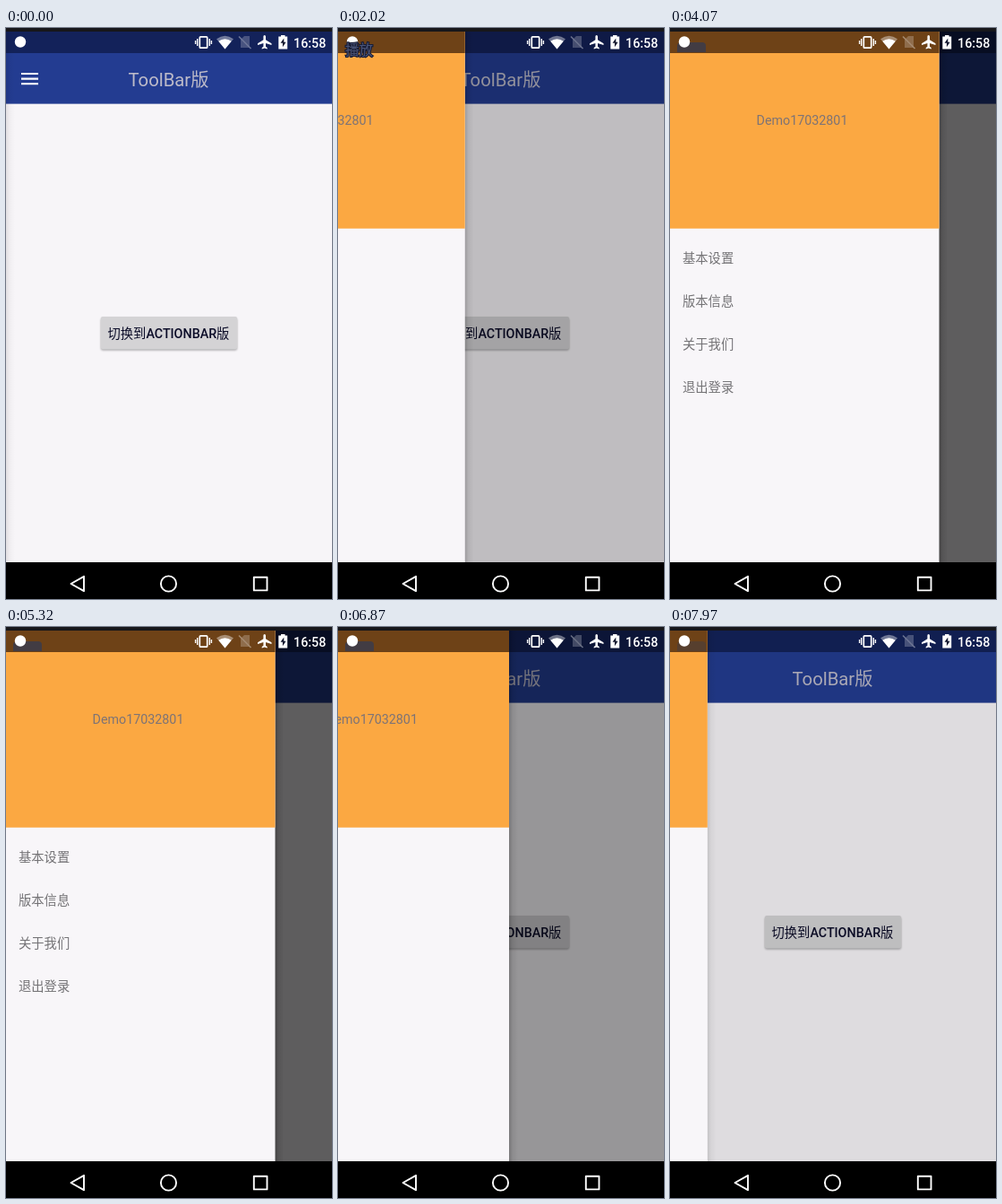
Write an HTML page that moves like this. It is 364 px wide and 637 px high and loops after 8000 ms.

```html
<!DOCTYPE html>
<html lang="zh">
<head>
<meta charset="utf-8">
<style>
html, body { margin: 0; height: 100%; overflow: hidden; background: #000; }
svg { display: block; width: 364px; height: 637px; }
text { font: 14.3px Roboto, "Noto Sans CJK SC", "Noto Sans CJK", sans-serif; }
.title { font-size: 20.3px; fill: #bdbbc9; }
.button { font-weight: 500; fill: #0b0c28; }
.button .cjk { font-weight: 400; }
.clock { font-weight: 500; fill: #fff; }
.menu { fill: #747376; }
.hint { font-size: 15.5px; fill: #4a5477; stroke: #171c35; stroke-width: 2.2px; paint-order: stroke; }
</style>
</head>
<body>
<svg viewBox="0 0 364 637">
  <defs>
    <linearGradient id="shade">
      <stop offset="0" stop-color="#000" stop-opacity=".3"/>
      <stop offset=".4" stop-color="#000" stop-opacity=".1"/>
      <stop offset="1" stop-color="#000" stop-opacity="0"/>
    </linearGradient>
    <filter id="soft" x="-10%" y="-20%" width="120%" height="150%"><feGaussianBlur stdDeviation="1.1"/></filter>
  </defs>

  <!-- page -->
  <rect width="364" height="596" fill="#f7f5f8"/>
  <rect width="364" height="84.6" fill="#233c91"/>
  <rect width="364" height="28" fill="#13225a"/>
  <path d="M17 51h19M17 56.6h19M17 62.2h19" stroke="#fff" stroke-width="2.1"/>
  <text class="title" x="136.5" y="64.6">ToolBar版</text>
  <rect x="106" y="323.5" width="152" height="36" rx="2" fill="#000" opacity=".35" filter="url(#soft)"/>
  <rect x="106" y="322" width="152" height="36.5" rx="2" fill="#d4d3d5"/>
  <text class="button" x="113.5" y="345.7"><tspan class="cjk">切换到</tspan>ACTIONBAR<tspan class="cjk">版</tspan></text>
  <rect id="scrim" width="364" height="596"/>

  <!-- drawer, origin at its right edge -->
  <g id="drawer">
    <rect id="shadow" y="4" width="10" height="592" fill="url(#shade)"/>
    <rect x="-301" width="301" height="596" fill="#f8f6f9"/>
    <rect x="-301" width="301" height="223.7" fill="#fba842"/>
    <rect x="-301" width="301" height="28" fill="#6e4217"/>
    <text x="-204" y="107.5" fill="#7d7376">Demo17032801</text>
    <g id="menu"></g>
  </g>

  <!-- system bars -->
  <rect width="364" height="4" fill="#17171b"/>
  <path id="stain" d="M8 27V20q0-4 5-4h23q4 0 4 4v7z" fill="#3b3b4b"/>
  <circle cx="16" cy="15.5" r="6.2" fill="#fff"/>
  <text id="hint" class="hint" x="8" y="29.5">播放</text>
  <g fill="none" stroke="#fff" stroke-width="1.7">
    <rect x="216.3" y="9.8" width="8.4" height="12.4" rx="1"/>
    <path d="M213.7 12v8M227.3 12v8M211.6 14v4M229.4 14v4" stroke-width="1.4"/>
  </g>
  <path d="M235 12.2q9.5-7 19 0L244.5 23.5z" fill="#fff" opacity=".4"/>
  <path d="M237.3 14.8q7.2-5 14.4 0L244.5 23.5z" fill="#fff"/>
  <g opacity=".38">
    <path d="M262 13l4-4h6v13h-10z" fill="#fff" opacity=".6"/>
    <path d="M260 9.5l13.5 13.5" stroke="#fff" stroke-width="1.6"/>
  </g>
  <path d="M296.5 19v-1.8l-6.500-4v-3.7q0-1.5-1.3-1.5t-1.3 1.5v3.7l-6.4 4V19l6.4-2v3.8l-1.7 1.3v1.3l3-.8 3 .8v-1.3l-1.700-1.300V17z" fill="#fff"/>
  <path d="M307 9.500V8h4.500v1.500h2.700V23.500h-9.900V9.500z" fill="#fff"/>
  <path d="M310.300 11.500l-3.800 5.300h2.400v4.400l3.700-5.500h-2.300z" fill="#13182f"/>
  <text class="clock" x="321" y="21.500">16:58</text>
  <rect y="596" width="364" height="41"/>
  <g fill="none" stroke="#fff" stroke-width="1.9" stroke-linejoin="round">
    <path d="M87 611.800v16.400L72.500 620z"/>
    <circle cx="181.500" cy="620" r="8.600"/>
    <rect x="276.800" y="612.700" width="14.700" height="14.700"/>
  </g>
</svg>
<script>
const LOOP = 8000;
const FULL = 300.5;
// time, drawer width, scrim opacity
const keys = [
  [0, 0, 0], [1250, 0, 0], [1790, 88.4, .1], [2565, 268, .535], [2960, FULL, .62],
  [5782, FULL, .62], [6000, 296, .61], [6250, 274, .565], [6885, 191, .39], [7970, 41.8, .1]
];
// start, end and number of redraws while the drawer is dragged
const drags = [
  [1330, 2020, 10], [2170, 2960, 11], [5860, 6640, 11], [6730, 7040, 5], [7190, 7970, 11]
];
const $ = id => document.getElementById(id);

['基本设置', '版本信息', '关于我们', '退出登录'].forEach((label, i) => {
  $('menu').insertAdjacentHTML('beforeend',
    `<text class="menu" x="-286.5" y="${261.5 + 48 * i}">${label}</text>`);
});

// Time of the latest redraw at time t
function snap(t) {
  let last = 0;
  for (const [start, end, count] of drags) {
    if (t < start) break;
    const step = (end - start) / (count - 1);
    last = Math.min(end, start + Math.floor((t - start + 16) / step) * step);
  }
  return last;
}

function pose(t) {
  const i = keys.findIndex(k => k[0] >= t);
  if (i < 1) return keys[i < 0 ? keys.length - 1 : 0];
  const a = keys[i - 1], b = keys[i];
  const p = (t - a[0]) / (b[0] - a[0]);
  return a.map((v, j) => v + (b[j] - v) * p);
}

function draw() {
  const t = performance.now() % LOOP;
  const [, width, dim] = pose(snap(t));
  $('drawer').setAttribute('transform', `translate(${width.toFixed(2)})`);
  $('shadow').setAttribute('opacity', .3 + .6 * width / FULL);
  $('scrim').setAttribute('opacity', dim);
  $('hint').setAttribute('opacity', t >= 1330 && t < 3040 ? 1 : 0);
  $('stain').setAttribute('opacity', t < 3040 ? 0 : t < 7190 ? .85 : .45);
  requestAnimationFrame(draw);
}
draw();
</script>
</body>
</html>
```
